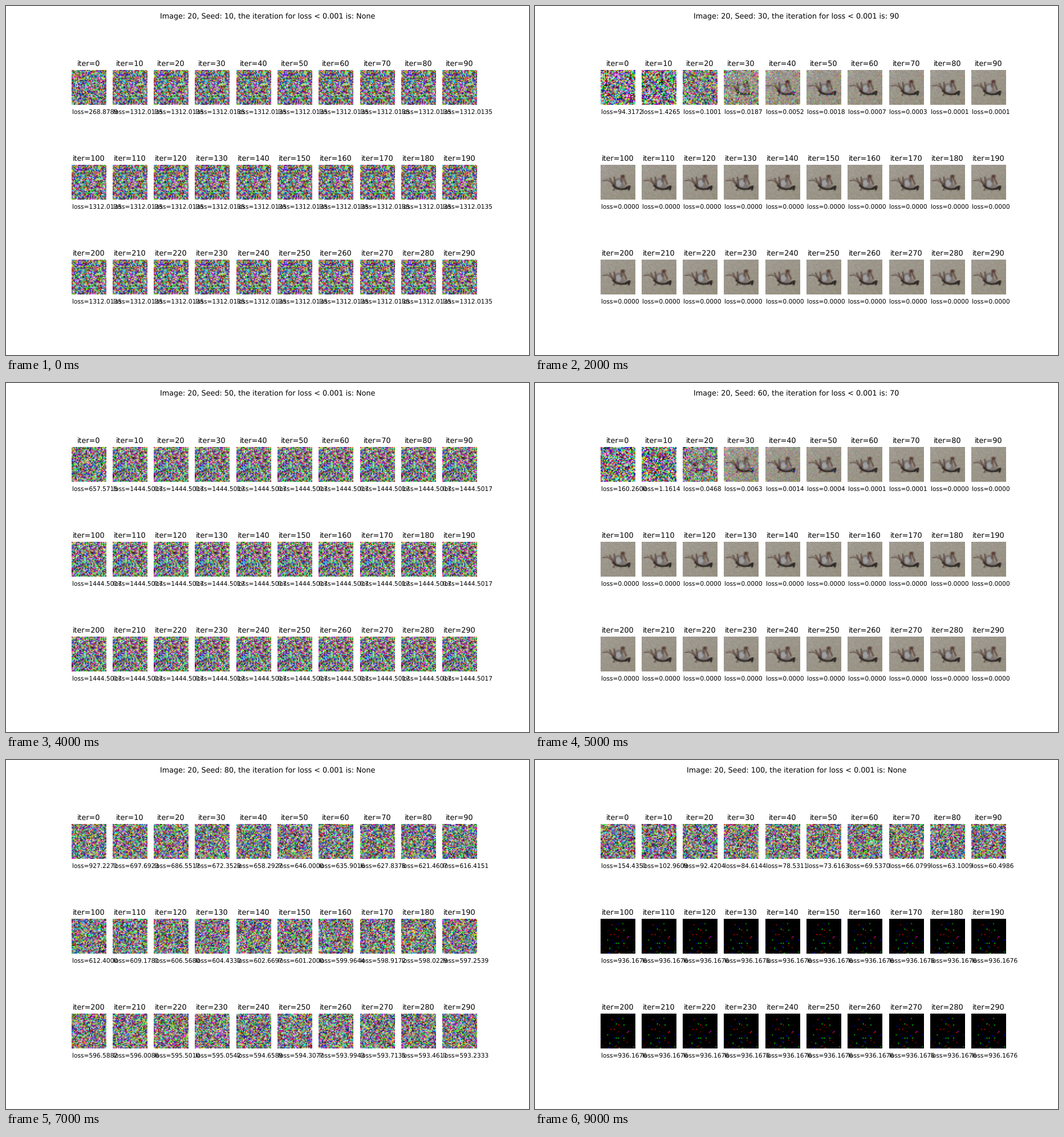
A matplotlib script for the animation above (10 s loop, 917 px wide and 611 px high).

```python
import numpy as np
import matplotlib.pyplot as plt
from matplotlib.animation import FuncAnimation

plt.rcParams["text.hinting"] = "none"

DPI = 76.4
N = 32
ROWS, COLS = 3, 10
STEPS = ROWS * COLS
SEEDS = range(10, 101, 10)

yy, xx = np.mgrid[0:N, 0:N].astype(float)


# Loss curves: each takes k, the number of ten-iteration steps, from 1 up.
def flat(value):
    return lambda k: value


def decay(scale, power=3.4, rate=0.3):
    return lambda k: scale * k ** -power * np.exp(-rate * (k - 1))


def plateau(k):
    return 590 + 112 / (1 + (k / 5) ** 2)


def collapse(k):
    return 102.9609 * (4 / (k + 3)) ** 0.484 if k < COLS else 936.1676


# seed: (loss at the start, loss curve)
RUNS = {
    10: (268.8789, flat(1312.0135)),
    20: (51.0824, decay(0.8586)),
    30: (94.3172, decay(1.4265)),
    40: (118.8709, decay(1.9829, 1.7, 0.8)),
    50: (657.5715, flat(1444.5017)),
    60: (160.2600, decay(1.1614, 4.2)),
    70: (87.6402, decay(1.2938)),
    80: (927.2271, plateau),
    90: (132.5081, decay(1.5317)),
    100: (154.4351, collapse),
}


def loss_at(seed, step):
    start, curve = RUNS[seed]
    return curve(step) if step else start


def reached(seed):
    """First iteration with a negligible loss, or None."""
    return next((10 * s for s in range(STEPS) if loss_at(seed, s) < 1e-4), None)


def blend(img, mask, color):
    return img + mask[..., None] * (np.array(color) / 255 - img)


def stroke(points, width):
    """Soft mask around a polyline."""
    dist = np.full((N, N), 99.0)
    for (x0, y0), (x1, y1) in zip(points, points[1:]):
        dx, dy = x1 - x0, y1 - y0
        t = np.clip(((xx - x0) * dx + (yy - y0) * dy) / (dx * dx + dy * dy), 0, 1)
        dist = np.minimum(dist, np.hypot(xx - x0 - t * dx, yy - y0 - t * dy))
    return np.clip(width / 2 + 0.5 - dist, 0, 1)


def blob(cx, cy, rx, ry):
    r = np.hypot((xx - cx) / rx, (yy - cy) / ry)
    return np.clip((1 - r) * min(rx, ry) + 0.5, 0, 1)


def make_photo():
    rng = np.random.default_rng(4)
    shade = (xx + yy)[..., None] / (2 * N)
    img = np.array([160, 155, 146]) / 255 - shade * np.array([.04, .045, .07])
    img += rng.normal(0, 0.015, (N, N, 1))
    dark, brown = (36, 30, 28), (88, 64, 56)
    img = blend(img, 0.8 * blob(17, 16.5, 6.5, 5), (118, 110, 107))
    img = blend(img, 0.8 * blob(16, 16.5, 2.5, 3), (166, 170, 175))
    img = blend(img, 0.7 * blob(21.5, 15.5, 1, 2.5), (184, 160, 142))
    for limb in ([(8, 12), (10, 16), (13, 18)], [(12, 11), (13, 17)],
                 [(19, 10), (18.5, 15)], [(20, 10), (23, 17)], [(13, 20), (11.5, 23)]):
        img = blend(img, 0.8 * stroke(limb, 1.3), brown)
    img = blend(img, 0.85 * blob(20, 10, 2, 1.5), (86, 58, 48))
    img = blend(img, 0.75 * stroke([(2, 14), (6, 13.5), (9, 15.5), (12, 19)], 1), brown)
    img = blend(img, 0.95 * stroke([(11, 18.5), (14, 21), (18, 22), (23, 21.5)], 1.6), dark)
    img = blend(img, 0.95 * stroke([(23, 21), (26, 19.5), (25.5, 22)], 2), dark)
    return np.clip(img, 0, 1)


def make_dots():
    rng = np.random.default_rng(100)
    img = np.zeros((N, N, 3))
    for _ in range(40):
        x, y = rng.integers(0, N, 2)
        img[y, x, rng.integers(3)] = rng.uniform(0.3, 0.85)
    for x, y in ((14, 9), (21, 10), (14, 22), (16, 22), (21, 22)):
        img[y, x] = 0, 0.8, 0
    return img


PHOTO = make_photo()
DOTS = make_dots()

# Leftover noise is strongest at the rim and near the dark tip.
SPREAD = 0.55 + 0.9 * (np.hypot(xx - 15.5, yy - 15.5) / 22) ** 2
SPREAD += 1.1 * np.exp(-((xx - 25) ** 2 + (yy - 21) ** 2) / 6)


def recovered(seed, step):
    loss = loss_at(seed, step)
    if loss > 0.2:
        return np.random.default_rng([seed, step]).beta(0.55, 0.55, (N, N, 3))
    noise = np.random.default_rng(seed).normal(0, 1, (N, N, 3)) * SPREAD[..., None]
    return (PHOTO + (1.4 * np.sqrt(loss) + 0.004) * noise) % 1


def panel(seed, step):
    curve = RUNS[seed][1]
    if reached(seed):
        return recovered(seed, step)
    if curve is collapse and step >= COLS:
        return DOTS
    if curve not in (plateau, collapse):
        step = min(step, 1)
    return np.random.default_rng([seed, step]).random((N, N, 3))


fig, axes = plt.subplots(ROWS, COLS, figsize=(917 / DPI, 611 / DPI), dpi=DPI)
heading = fig.suptitle("", fontsize=12)
images, labels = [], []
for i, ax in enumerate(axes.flat):
    images.append(ax.imshow(np.zeros((N, N, 3))))
    ax.set_title(f"iter={i * 10}", fontsize=12)
    labels.append(ax.text(0, 40, "", fontsize=10))
    ax.axis("off")


def update(frame):
    seed = SEEDS[frame]
    heading.set_text(f"Image: 20, Seed: {seed}, the iteration for loss < 0.001 is: "
                     f"{reached(seed)}")
    for step in range(STEPS):
        images[step].set_data(panel(seed, step))
        labels[step].set_text(f"loss={loss_at(seed, step):.4f}")
    return [heading, *images, *labels]


anim = FuncAnimation(fig, update, frames=len(SEEDS), interval=1000,
                     repeat=True, repeat_delay=0, blit=False)
plt.show()
```
